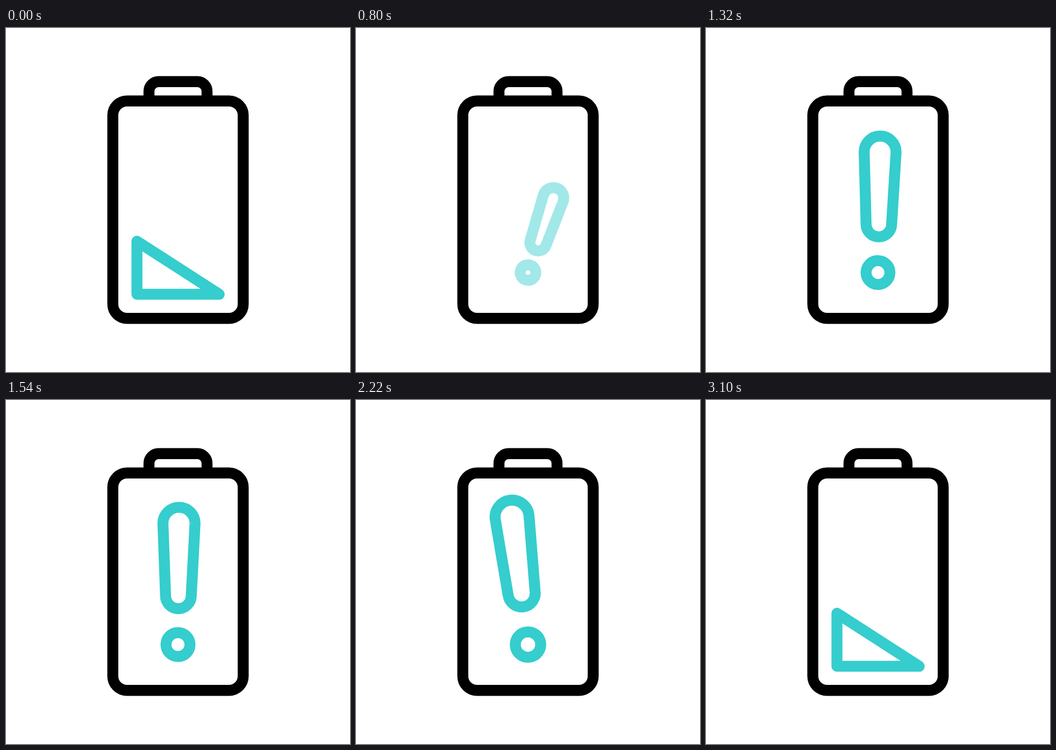
An HTML page for the animation above (3420 ms loop, 640 by 640 pixels).

```html
<!DOCTYPE html>
<html lang="en">
<head>
<meta charset="utf-8">
<title>Low battery</title>
<style>
  html, body { margin: 0; width: 100%; height: 100%; overflow: hidden; background: #fff; }
  svg { display: block; width: 100%; height: 100%; }
  svg * { fill: none; stroke-width: 20.4; stroke-linejoin: round; vector-effect: non-scaling-stroke; }
  #battery { stroke: #000; }
  #charge, #mark { stroke: #35cdcd; }
</style>
</head>
<body>
<svg viewBox="0 0 640 640">
  <g id="battery">
    <rect x="198.7" y="135.7" width="242.6" height="404.6" rx="26.5"/>
    <path d="M266 136V117.7a18 18 0 0 1 18-18H356a18 18 0 0 1 18 18V136"/>
  </g>
  <path id="charge"/>
  <g id="mark">
    <path d="M-30 -226.6A30 30 0 0 1 30 -226.6L24 -91.1A24 24 0 0 1 -24 -91.1Z"/>
    <circle r="22.4"/>
  </g>
</svg>
<script>
const LOOP = 3420, STEP = 20;
const SWING_START = 1000, SWING_TIME = 200;
const SWINGS = [-10, 10, -5, 2.8, 0, 0, -10]; // degrees at the end of each swing

const charge = document.getElementById('charge');
const mark = document.getElementById('mark');

const clamp = (v, lo, hi) => Math.min(hi, Math.max(lo, v));
const ramp = (t, from, to) => clamp((t - from) / (to - from), 0, 1);
// 1 outside the gap, falling to 0 and rising again at its two ends
const dip = (t, a, b, c, d) => 1 - ramp(t, a, b) + ramp(t, c, d);

function swing(t) {
  const pos = clamp((t - SWING_START) / SWING_TIME, 0, SWINGS.length - 1);
  const i = Math.floor(pos), from = SWINGS[i], to = SWINGS[i + 1] ?? from;
  return from + (to - from) * (pos - i);
}

function drawCharge(t) {
  const height = 98.6 * dip(t, 70, 815, 2600, 3100);
  charge.setAttribute('d', `M243.6 495.4v${-height}l153 ${height}Z`);
  charge.setAttribute('opacity', dip(t, 740, 800, 2600, 2640));
}

function drawMark(t) {
  const tilt = swing(t);
  const away = dip(t, 740, 1000, 2200, 2460); // 1 = small and leaning right
  const angle = tilt + 37.4 * away;
  const scale = 1 - tilt / 100 - 0.59 * away;
  mark.setAttribute('transform', `translate(320 455) rotate(${angle}) scale(${scale})`);
  mark.setAttribute('opacity', 1 - dip(t, 750, 860, 2340, 2468));
}

const start = performance.now();
function tick() {
  const now = (performance.now() - start) % LOOP;
  const t = Math.floor(now / STEP) * STEP;
  drawCharge(t);
  // the faint mark lingers until the charge returns
  drawMark(t < 2620 ? Math.min(t, 2460) : LOOP);
  requestAnimationFrame(tick);
}
tick();
</script>
</body>
</html>
```
